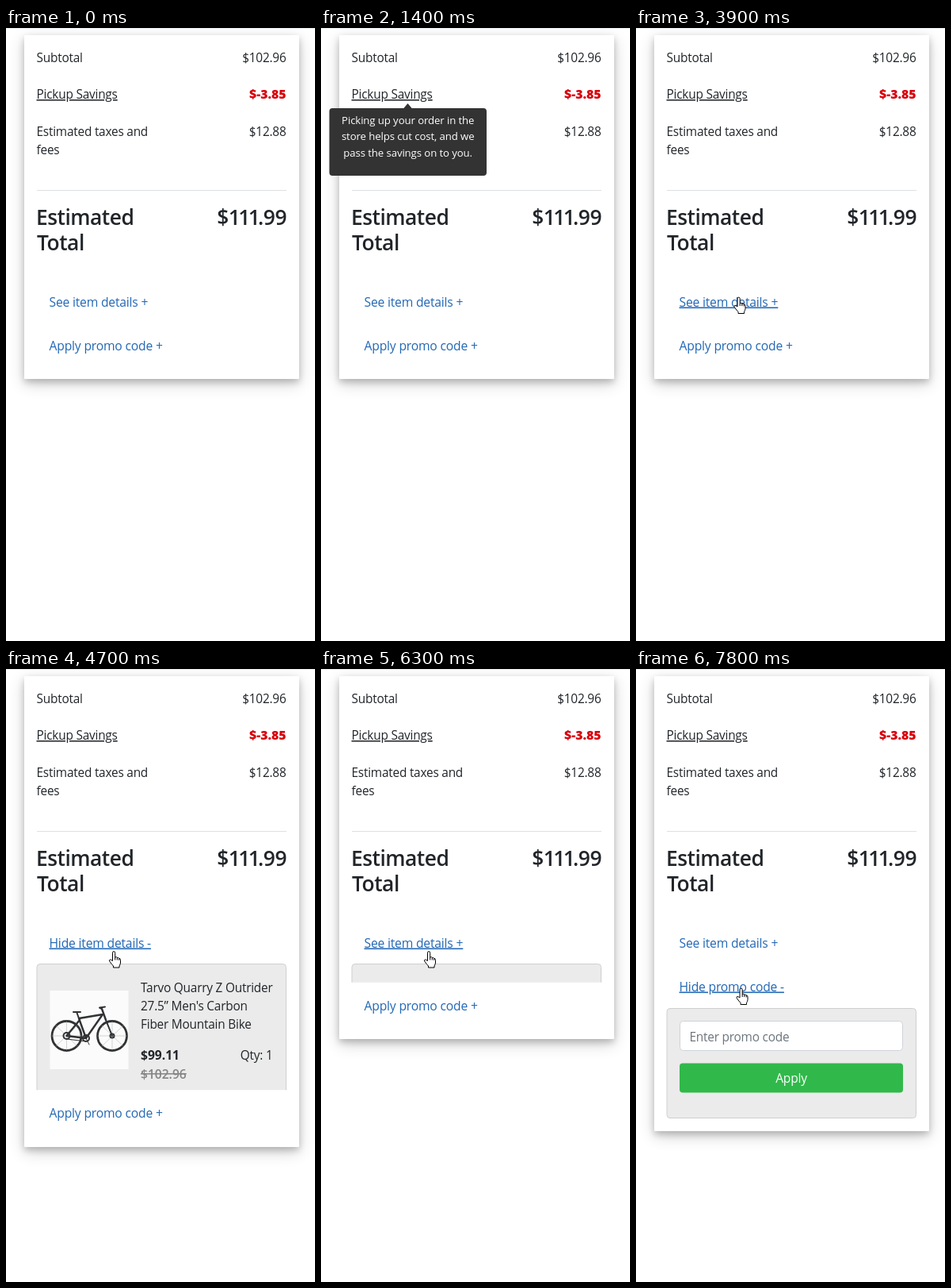
An HTML page that plays this animation: 390x772 px, repeating every 8000 ms.

```html
<!DOCTYPE html>
<html lang="en">
<head>
<meta charset="utf-8">
<title>Order summary</title>
<style>
  html, body { margin: 0; width: 100%; height: 100%; overflow: hidden; background: #fff; }
  #stage { position: relative; width: 390px; height: 772px; overflow: hidden; border-top: 1px solid #e9eeef; box-sizing: border-box; }
  #card {
    position: absolute; left: 23px; top: 8px; width: 347px; height: 433px; background: #fff; border-radius: 1px;
    box-shadow: 0 4px 8px rgba(0, 0, 0, .2), 0 6px 20px rgba(0, 0, 0, .19);
  }
  svg { position: absolute; left: 0; top: -1px; }
  text { font: 15.4px "Open Sans", "Noto Sans", sans-serif; letter-spacing: -.22px; fill: #212529; }
  .end { text-anchor: end; }
  .mid { text-anchor: middle; }
  .under { text-decoration: underline; }
  .save { font-size: 15.8px; font-weight: 800; letter-spacing: 0; fill: #d9000c; }
  .total { font-size: 26.4px; font-weight: 600; letter-spacing: -.5px; }
  .tight { letter-spacing: -2.6px; }
  .link { font-size: 15.7px; letter-spacing: -.2px; fill: #2368b5; }
  .price { font-size: 15.6px; font-weight: 700; letter-spacing: 0; }
  .old { font-size: 15.6px; font-weight: 600; letter-spacing: 0; fill: #858585; text-decoration: line-through; }
  .hint { fill: #6c757d; }
  .button { font-size: 15.6px; fill: #fff; }
  .panel { fill: #ebebeb; stroke: #cfcfcf; }
  #tip { opacity: 0; }
  #tip text { font-size: 13.2px; font-weight: 500; letter-spacing: -.1px; fill: #fff; text-anchor: middle; }
  .bike { fill: none; stroke: #303234; stroke-linecap: round; stroke-linejoin: round; }
  .cursor { fill: #fff; stroke: #000; stroke-linejoin: round; }
</style>
</head>
<body>
<div id="stage">
  <div id="card"></div>
  <svg width="390" height="772" viewBox="0 0 390 772">
    <defs>
      <clipPath id="detailsClip"><rect id="detailsView" x="23" y="370.5" width="347" height="0"/></clipPath>
      <clipPath id="promoClip"><rect id="promoView" x="23" y="426" width="347" height="0"/></clipPath>
    </defs>

    <text x="38.5" y="42.5">Subtotal</text>
    <text x="353.5" y="42.5" class="end">$102.96</text>
    <text x="38.5" y="89" class="under">Pickup Savings</text>
    <text x="353.5" y="89" class="end save">$-3.85</text>
    <text x="38.5" y="136">Estimated taxes and</text>
    <text x="38.5" y="159">fees</text>
    <text x="353.5" y="136" class="end">$12.88</text>
    <path d="M39 204.5H354" stroke="#dfe0e1"/>
    <text x="38" y="247.5" class="total">Estimated</text>
    <text x="39" y="279.5" class="total">Total</text>
    <text x="354" y="247.5" class="total end">$<tspan class="tight">111</tspan>.99</text>

    <text x="54.5" y="350.5" class="link" id="detailsLink"></text>
    <g clip-path="url(#detailsClip)">
      <rect class="panel" x="39" y="371.5" width="314.5" height="164.5" rx="4"/>
      <rect x="55.5" y="405" width="99" height="99" fill="#fbfbfb"/>
      <g class="bike">
        <g stroke-width="2.8">
          <circle cx="76.5" cy="462" r="18.5"/>
          <circle cx="134" cy="462" r="18.5"/>
        </g>
        <path stroke="#aaa" stroke-width=".5" d="M58 462h37M76.5 444v36M63 449l27 26M63 475l27-26M115.5 462h37M134 444v36M121 449l27 26M121 475l27-26"/>
        <path stroke-width="2.4" d="M101 465L92 440L122 435L101 465L76.5 462L93 442M121 428L126 442"/>
        <path stroke-width="2" d="M92 440L89.5 433M85 432h9M126 442L134 462M121 428l-3-1.500 7-1"/>
        <path stroke-width="1" d="M76.5 466L101 469M101 465l4 8"/>
        <circle cx="101" cy="465" r="4" stroke-width="2"/>
        <circle cx="76.5" cy="462" r="4" stroke-width="2"/>
        <circle cx="134" cy="462" r="2.5" stroke-width="2"/>
      </g>
      <text x="170" y="406.5">Tarvo Quarry Z Outrider</text>
      <text x="170" y="429.5">27.5” Men's Carbon</text>
      <text x="170" y="453">Fiber Mountain Bike</text>
      <text x="170" y="492" class="price">$99.11</text>
      <text x="336.5" y="492" class="end">Qty: 1</text>
      <text x="170" y="515.5" class="old">$102.96</text>
    </g>

    <g id="lower">
      <text x="54.5" y="405.5" class="link" id="promoLink"></text>
      <g clip-path="url(#promoClip)">
        <rect class="panel" x="39" y="427.5" width="314.5" height="138" rx="4"/>
        <rect x="55.5" y="443.5" width="281" height="37" rx="4" fill="#fff" stroke="#ced4da"/>
        <text x="67.5" y="469" class="hint">Enter promo code</text>
        <rect x="55" y="496.5" width="282" height="37" rx="4" fill="#30b94a"/>
        <text x="196" y="521" class="mid button">Apply</text>
      </g>
    </g>

    <g id="tip">
      <path fill="#333" d="M104 101.500l5.500-6.500 5.500 6.500z"/>
      <rect x="10.5" y="101" width="198.5" height="85" rx="4" fill="#333"/>
      <text x="109.7" y="120.5">Picking up your order in the</text>
      <text x="109.7" y="141">store helps cut cost, and we</text>
      <text x="109.7" y="161.5">pass the savings on to you.</text>
    </g>

    <path id="arrow" class="cursor" d="M.5.5v15l3.600-3.300 2.600 5.800 2.300-1-2.500-5.600h4.600Z"/>
    <g id="hand" class="cursor">
      <path d="M5 12.500V2.300a1.600 1.600 0 0 1 3.200 0V8q2.200-.8 2.600.6 2-.4 2.400.8 1.800 0 1.800 2V15q-.2 2-1.500 4v2H6v-2Q4 17 1.200 13q-.8-1.600.6-2 1.400 0 3.200 1.500Z"/>
      <path d="M8.200 8v3.500M10.800 8.600v3M13.200 9.400v2.500"/>
    </g>
  </svg>
</div>
<script>
  const LOOP = 8000, STEP = 100, SLIDE = 350;
  const DETAILS = 166, PROMO = 140;
  const OPEN = 4435, CLOSE = 6105, PROMO_OPEN = 6910;
  const el = id => document.getElementById(id);

  // Pointer stops as [time, x, y]
  const enter = [[100, 276, 668], [200, 205, 450], [300, 110, 190], [400, 58, 90],
    [800, 58, 90], [900, 63, 91], [1000, 63, 91], [1100, 48, 170], [1300, 14, 386]];
  const back = [[3100, 80, 155], [3300, 116, 310], [3400, 123, 338.5], [4000, 123, 338.5],
    [4300, 129.5, 355], [6500, 129.5, 355], [6800, 126, 401.5]];

  const progress = (t, start, length) => Math.min(1, Math.max(0, (t - start) / length));
  const bezier = (a, b, u) => 3 * a * u * (1 - u) ** 2 + 3 * b * u * u * (1 - u) + u ** 3;

  // cubic-bezier(.25, .1, .25, 1)
  function ease(p) {
    let low = 0, high = 1;
    for (let i = 0; i < 20; i++) {
      const mid = (low + high) / 2;
      if (bezier(.25, .25, mid) < p) low = mid; else high = mid;
    }
    return p === 0 || p === 1 ? p : bezier(.1, 1, low);
  }
  const slide = (t, start) => ease(progress(t, start, SLIDE));

  function along(stops, t) {
    const next = stops.findIndex(stop => stop[0] > t);
    if (next < 0) return stops[stops.length - 1].slice(1);
    const [t0, x0, y0] = stops[next - 1], [t1, x1, y1] = stops[next];
    const p = (t - t0) / (t1 - t0);
    return [x0 + (x1 - x0) * p, y0 + (y1 - y0) * p];
  }

  function setLink(id, label, hovered) {
    el(id).textContent = label;
    el(id).classList.toggle('under', hovered);
  }

  function drawPointer(t) {
    const shown = t >= 100 && t < 1400 || t >= 3100;
    const isHand = t >= 3400;
    el('arrow').style.display = shown && !isHand ? '' : 'none';
    el('hand').style.display = shown && isHand ? '' : 'none';
    if (!shown) return;
    const [x, y] = along(t < 1400 ? enter : back, t);
    el(isHand ? 'hand' : 'arrow').setAttribute('transform', `translate(${x} ${y})`);
  }

  function draw(t) {
    const details = DETAILS * (slide(t, OPEN) - slide(t, CLOSE));
    const promo = PROMO * slide(t, PROMO_OPEN);
    el('card').style.height = 433 + details + promo + 'px';
    el('detailsView').setAttribute('height', details);
    el('promoView').setAttribute('height', promo);
    el('lower').setAttribute('transform', `translate(0 ${details})`);
    setLink('detailsLink', t >= OPEN && t < CLOSE ? 'Hide item details -' : 'See item details +', t >= 3400 && t < 6600);
    setLink('promoLink', t >= PROMO_OPEN ? 'Hide promo code -' : 'Apply promo code +', t >= 6800);
    el('tip').style.opacity = progress(t, 950, 400) * (1 - progress(t, 2170, 430) ** 2);
    drawPointer(t);
  }

  const start = performance.now();
  function tick() {
    const t = (performance.now() - start) % LOOP;
    draw(Math.floor(t / STEP) * STEP);
    requestAnimationFrame(tick);
  }
  tick();
</script>
</body>
</html>
```
